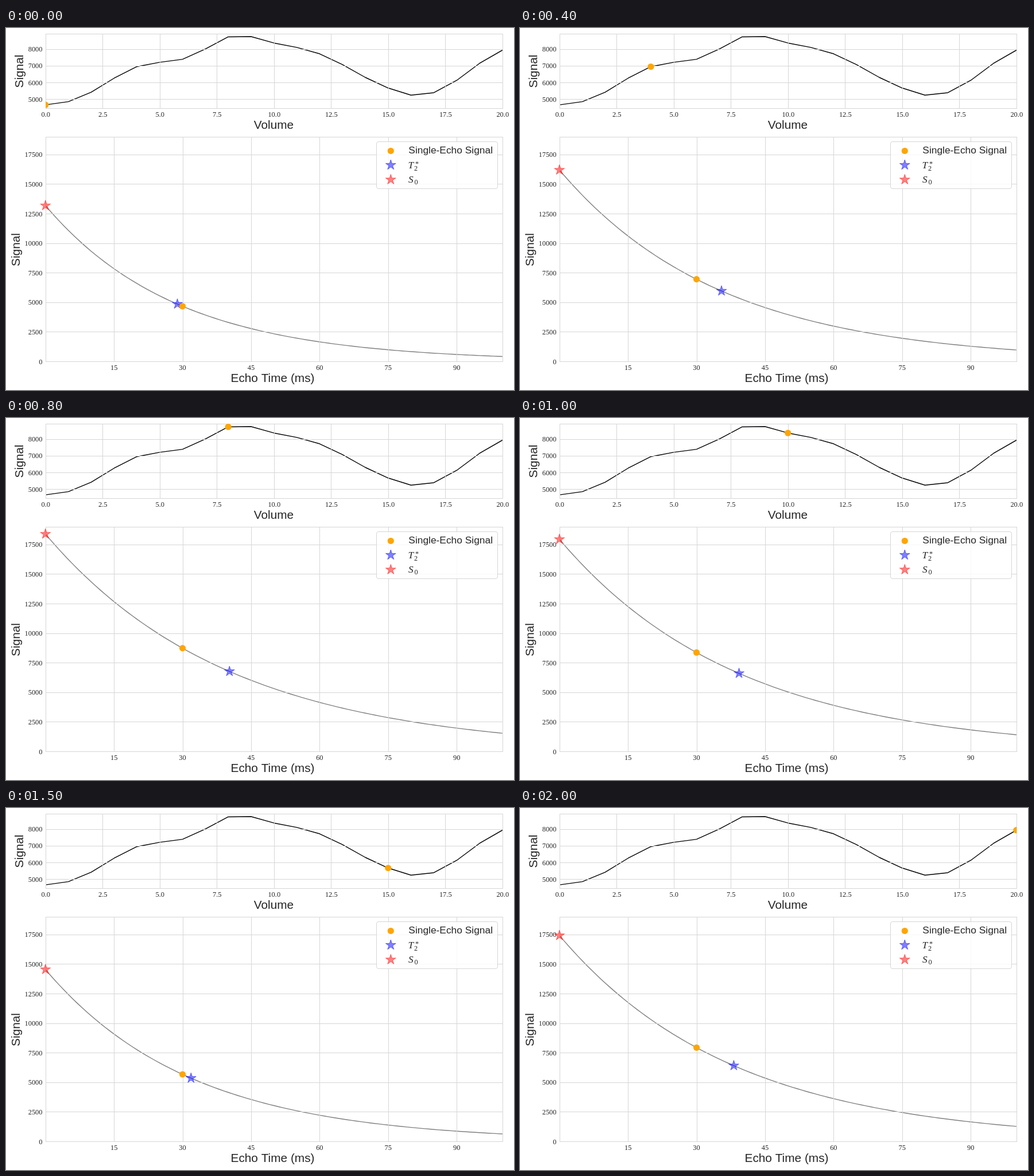
Write an HTML page with a canvas that moves like this. It is 885 by 632 pixels and loops after 2.1 s.

```html
<!DOCTYPE html>
<html lang="en">
<head>
<meta charset="utf-8">
<title>Signal decay</title>
<style>
html, body { margin: 0; width: 100%; height: 100%; overflow: hidden; background: #fff; }
canvas { display: block; }
</style>
</head>
<body>
<canvas id="stage" width="885" height="632"></canvas>
<script>
const ctx = document.getElementById('stage').getContext('2d');
const signal = [4661, 4853, 5419, 6252, 6946, 7205, 7385, 8000, 8727, 8744, 8360,
  8096, 7715, 7070, 6303, 5669, 5240, 5388, 6125, 7143, 7931];
const STEP = 100, ECHO = 30, RATIO = 456.4;
const LEFT = 69, RIGHT = 865;
const SANS = '"Liberation Sans", Arial, sans-serif';
const SERIF = '"Liberation Serif", Times, serif';
const INK = '#262626', GRID = '#d6d6d6';
const BLUE = 'rgba(0,0,255,0.5)', RED = 'rgba(255,0,0,0.5)';

const volX = v => 68.75 + 39.8 * v;
const volY = s => 36.7 + (8000 - s) * 0.0292;
const echoX = t => 68.75 + 7.96 * t;
const echoY = s => 582 - s * 0.02064;
const decay = (t, t2) => RATIO * t2 * Math.exp(-t / t2);

// Decay time whose curve passes through s at the echo time
function solveT2(s) {
  let lo = 10, hi = 80;
  for (let i = 0; i < 40; i++) {
    const mid = (lo + hi) / 2;
    if (decay(ECHO, mid) < s) lo = mid; else hi = mid;
  }
  return lo;
}

function text(str, x, y, size, family, align = 'center', style = '') {
  ctx.font = `${style} ${size}px ${family}`;
  ctx.textAlign = align;
  ctx.fillStyle = INK;
  ctx.fillText(str, x, y);
}

function sideText(str, x, y) {
  ctx.save();
  ctx.translate(x, y);
  ctx.rotate(-Math.PI / 2);
  text(str, 0, 0, 20.8, SANS);
  ctx.restore();
}

const tick = (str, x, y, align) => text(str, x, y, 12.4, SERIF, align);

// Grid lines snap to whole pixels
function hline(y) {
  ctx.fillStyle = GRID;
  ctx.fillRect(LEFT, Math.round(y), RIGHT - LEFT + 1, 1);
}

function vline(x, top, bottom) {
  ctx.fillStyle = GRID;
  ctx.fillRect(Math.round(x), top, 1, bottom - top + 1);
}

function frame(top, bottom) {
  hline(top);
  hline(bottom);
  vline(LEFT, top, bottom);
  vline(RIGHT, top, bottom);
}

function polyline(points, color) {
  ctx.beginPath();
  points.forEach(([x, y]) => ctx.lineTo(x, y));
  ctx.strokeStyle = color;
  ctx.lineWidth = 1.4;
  ctx.lineJoin = 'round';
  ctx.stroke();
}

function dot(x, y) {
  ctx.beginPath();
  ctx.arc(x, y, 5.6, 0, 2 * Math.PI);
  ctx.fillStyle = '#ffa500';
  ctx.fill();
}

function star(x, y, color) {
  ctx.beginPath();
  for (let i = 0; i < 10; i++) {
    const r = i % 2 ? 3.55 : 9.3, a = i * Math.PI / 5;
    ctx.lineTo(x + r * Math.sin(a), y - r * Math.cos(a));
  }
  ctx.closePath();
  ctx.fillStyle = ctx.strokeStyle = color;
  ctx.lineWidth = 1;
  ctx.lineJoin = 'bevel';
  ctx.fill();
  ctx.stroke();
}

function clipped(top, bottom, draw) {
  ctx.save();
  ctx.beginPath();
  ctx.rect(LEFT, top, RIGHT - LEFT, bottom - top);
  ctx.clip();
  draw();
  ctx.restore();
}

function volumePlot(n) {
  const top = 10, bottom = 140;
  clipped(top, bottom, () => polyline(signal.map((s, v) => [volX(v), volY(s)]), '#000'));
  for (let v = 0; v <= 20; v += 2.5) {
    vline(volX(v), top, bottom);
    tick(v.toFixed(1), volX(v) + 0.5, 155);
  }
  for (let s = 5000; s <= 8000; s += 1000) {
    hline(volY(s));
    tick(s, 63.5, volY(s) + 4.5, 'right');
  }
  frame(top, bottom);
  clipped(top, bottom, () => dot(volX(n), volY(signal[n])));
  text('Volume', 466.5, 176, 20.8, SANS);
  sideText('Signal', 30, 75.5);
}

function legend() {
  ctx.beginPath();
  ctx.roundRect(645.5, 198.5, 211, 82, 3.5);
  ctx.fillStyle = 'rgba(255,255,255,0.8)';
  ctx.fill();
  ctx.strokeStyle = GRID;
  ctx.lineWidth = 1;
  ctx.stroke();
  dot(670.3, 214.5);
  star(670.3, 239.3, BLUE);
  star(670.3, 264.8, RED);
  text('Single-Echo Signal', 701.3, 218.5, 17.36, SANS, 'left');
  text('T', 700.5, 244.5, 17.4, SERIF, 'left', 'italic');
  text('2', 711, 248.5, 12.2, SERIF, 'left');
  text('*', 713, 240.5, 12.2, SERIF, 'left');
  text('S', 701, 270, 17.4, SERIF, 'left', 'italic');
  text('0', 711.5, 272.5, 12.2, SERIF, 'left');
}

function decayPlot(s) {
  const top = 190, bottom = 582, t2 = solveT2(s), curve = [];
  for (let t = 0; t <= 100; t++) curve.push([echoX(t), echoY(decay(t, t2))]);
  clipped(top, bottom, () => polyline(curve, 'rgba(0,0,0,0.5)'));
  for (let t = 15; t <= 90; t += 15) {
    vline(echoX(t), top, bottom);
    tick(t, echoX(t), 596.5);
  }
  for (let v = 0; v <= 17500; v += 2500) {
    hline(echoY(v));
    tick(v, 63.5, echoY(v) + 4.5, 'right');
  }
  frame(top, bottom);
  star(echoX(t2), echoY(decay(t2, t2)), BLUE);
  star(echoX(0), echoY(decay(0, t2)), RED);
  dot(echoX(ECHO), echoY(s));
  text('Echo Time (ms)', 464.5, 618, 20.8, SANS);
  sideText('Signal', 24, 387);
  legend();
}

function draw() {
  const n = Math.floor(performance.now() / STEP) % signal.length;
  ctx.fillStyle = '#fff';
  ctx.fillRect(0, 0, 885, 632);
  volumePlot(n);
  decayPlot(signal[n]);
  requestAnimationFrame(draw);
}
draw();
</script>
</body>
</html>
```
